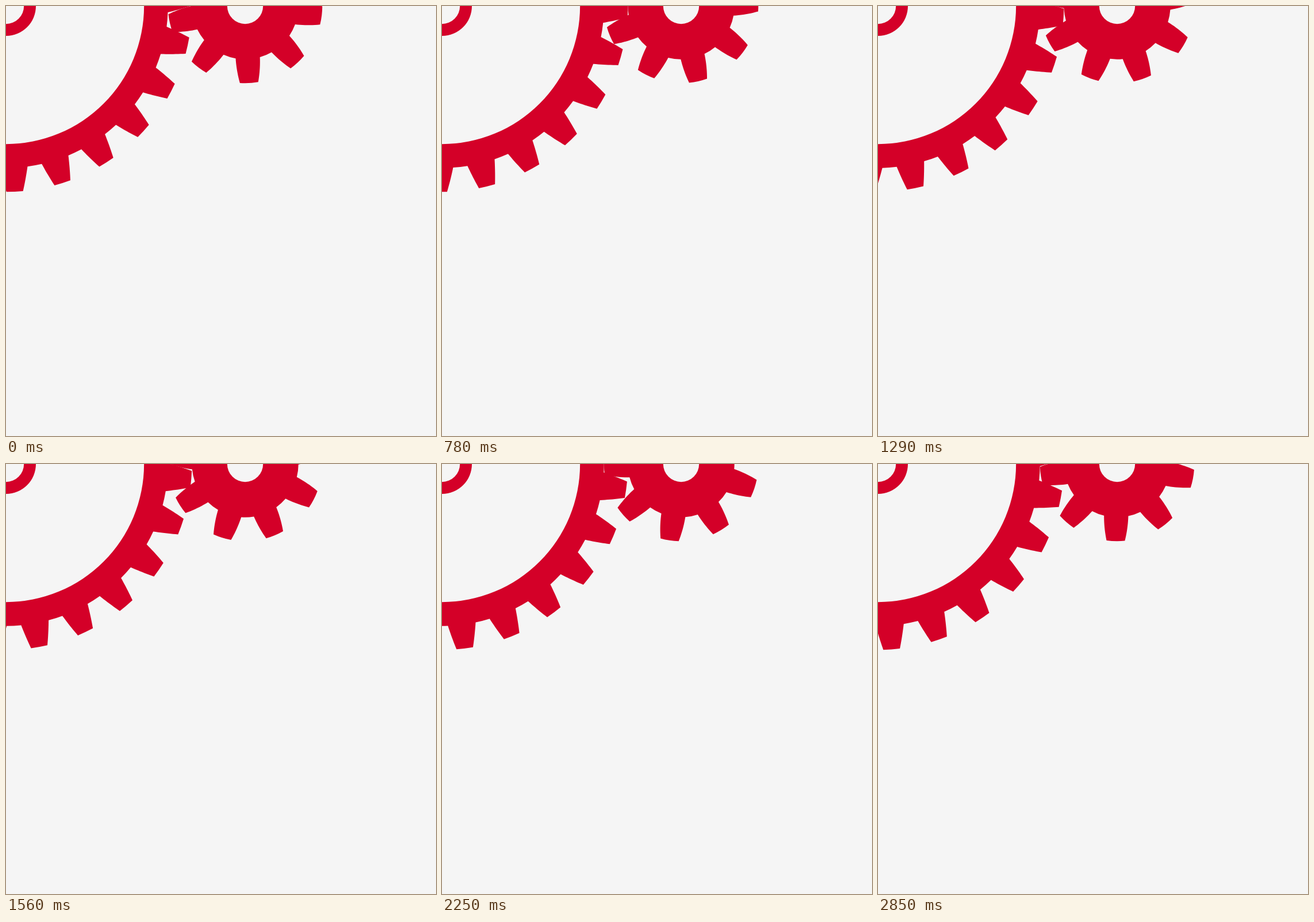
Animation, 748 px wide and 748 px high, one loop 2880 ms. Source, as an HTML page with a canvas:

```html
<!DOCTYPE html>
<html lang="en">
<head>
<meta charset="utf-8">
<title>Gears</title>
<style>
html, body { margin: 0; width: 100%; height: 100%; overflow: hidden; background: #f5f5f5; }
canvas { display: block; }
</style>
</head>
<body>
<canvas id="stage" width="748" height="748"></canvas>
<script>
const ctx = document.getElementById('stage').getContext('2d');
const RED = '#d40028', BACK = '#f5f5f5';
const STEP = 30, STEPS = 96;
const TAU = Math.PI * 2, RAD = Math.PI / 180;
const DISTANCE = 416, DEPTH = 20.8, HOLE = 31.2;
const TIP = 0.1705, ROOT = 0.3295; // half tooth widths as shares of the pitch

const big = { x: 0, teeth: 24, phase: 12.3, turn: 13.5 };
const small = { x: DISTANCE, teeth: 9, phase: 87.08, turn: -36 };
for (const g of [big, small]) {
  g.radius = DISTANCE * g.teeth / (big.teeth + small.teeth);
}

function circle(x, r) {
  ctx.moveTo(x + r, 0);
  ctx.arc(x, 0, r, 0, TAU);
}

// One side of a tooth: the angle changes evenly with the radius.
function flank(g, mid, pitch, side) {
  const n = 10;
  for (let i = 0; i <= n; i++) {
    const k = side < 0 ? i / n : 1 - i / n;
    const r = g.radius + DEPTH * (2 * k - 1);
    const a = mid + side * pitch * (ROOT + (TIP - ROOT) * k);
    ctx.lineTo(g.x + r * Math.cos(a), r * Math.sin(a));
  }
}

function outline(g, progress) {
  const pitch = TAU / g.teeth;
  const start = (g.phase + g.turn * progress) * RAD;
  for (let i = 0; i < g.teeth; i++) {
    const mid = start + i * pitch;
    flank(g, mid, pitch, -1);
    ctx.arc(g.x, 0, g.radius + DEPTH, mid - TIP * pitch, mid + TIP * pitch);
    flank(g, mid, pitch, 1);
    ctx.arc(g.x, 0, g.radius - DEPTH, mid + ROOT * pitch, mid + (1 - ROOT) * pitch);
  }
  ctx.closePath();
}

function draw(progress) {
  ctx.fillStyle = BACK;
  ctx.fillRect(0, 0, 748, 748);
  ctx.fillStyle = RED;

  ctx.beginPath();
  outline(big, progress);
  circle(big.x, big.radius - DEPTH * 3);
  circle(big.x, 52);
  circle(big.x, HOLE);
  ctx.fill('evenodd');

  ctx.beginPath();
  outline(small, progress);
  circle(small.x, HOLE);
  ctx.fill('evenodd');
}

const begin = performance.now();
function tick() {
  const step = Math.floor((performance.now() - begin) / STEP) % STEPS;
  draw(step / (STEPS - 1));
  requestAnimationFrame(tick);
}
tick();
</script>
</body>
</html>
```
